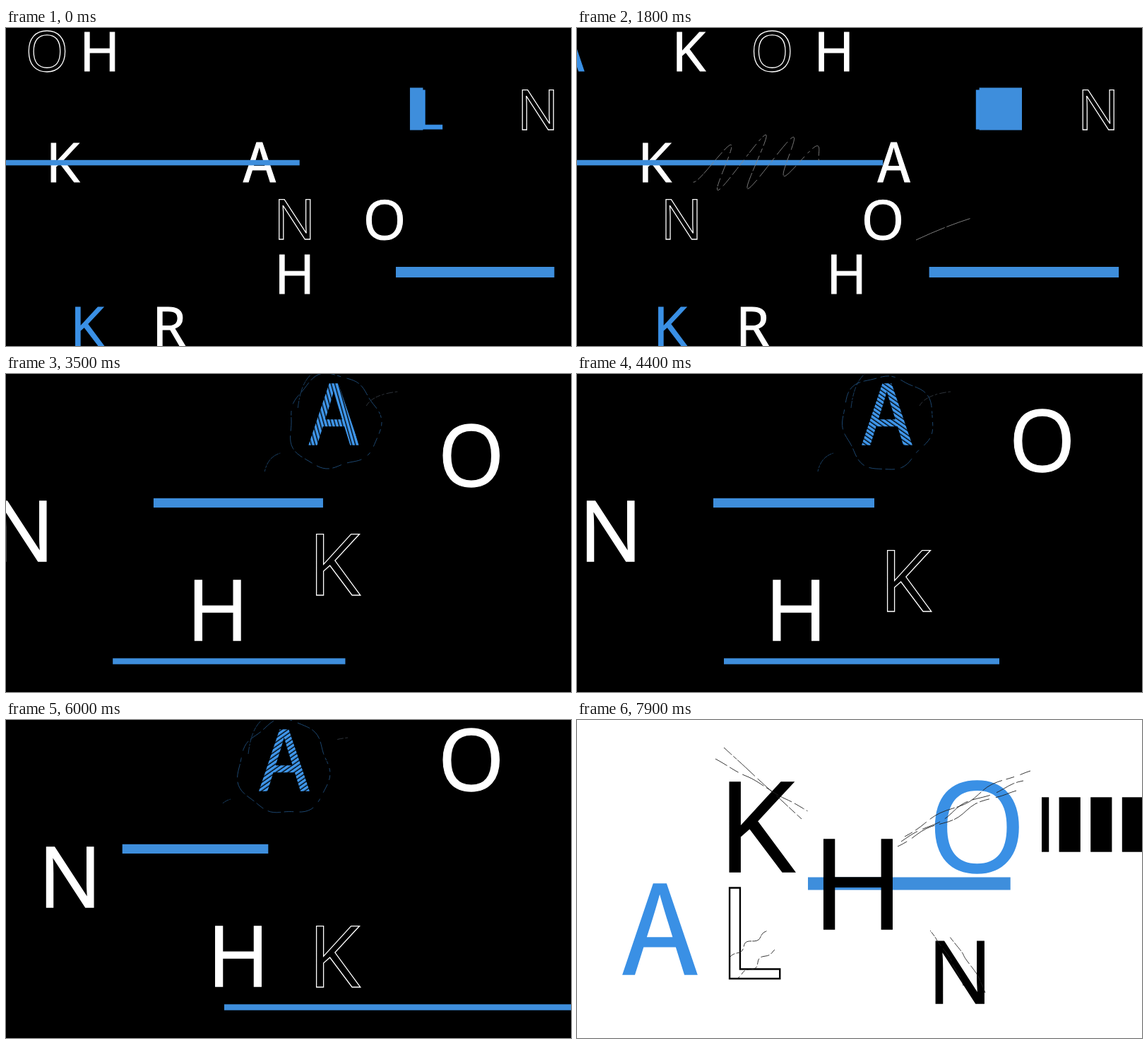
These frames come from a looping animation (800x450 px, 8000 ms). An HTML page:

```html
<!DOCTYPE html>
<html lang="en">
<head>
<meta charset="utf-8">
<title>Letters in motion</title>
<style>
  html, body { margin: 0; width: 100%; height: 100%; overflow: hidden; background: #000; }
  svg { display: block; width: 100vw; height: 100vh; }
  text { font-family: "Open Sans", "Noto Sans", sans-serif; }
  text.narrow { font-family: "Noto Sans CJK JP", "Noto Sans CJK SC", "Noto Sans CJK KR", "Open Sans", sans-serif; }
</style>
</head>
<body>
<svg id="stage" viewBox="0 0 800 450">
  <defs>
    <pattern id="hatch" width="10" height="5" patternUnits="userSpaceOnUse">
      <rect width="10" height="5" fill="#000"/>
      <rect width="10" height="3.6" fill="#3f97ec"/>
    </pattern>
  </defs>
</svg>
<script>
const BLUE = '#3e8edc', INK_BLUE = '#3a90e5', WHITE = '#fff', BLACK = '#000';
const stage = document.getElementById('stage');
const hatch = document.getElementById('hatch');

function add(parent, tag, attrs = {}) {
  const el = document.createElementNS('http://www.w3.org/2000/svg', tag);
  for (const k in attrs) el.setAttribute(k, attrs[k]);
  parent.appendChild(el);
  return el;
}

// Motion: every value is a constant or a function of seconds.
const at = (v, t) => typeof v === 'function' ? v(t) : v;
const line = (t0, a, t1, b) => t => a + (b - a) * (t - t0) / (t1 - t0);
const speedUp = (a, b, p = 2.7) => t => a + (b - a) * (t / 2.6) ** p;
const slowDown = (a, b, p = 2.75) => {
  const f = t => 1 - (1 - Math.min(t, 3) / 3) ** p;
  return t => a + (b - a) * f(t) / f(2.6);
};
const early = (a, b) => line(0, a, 2.6, b);
const mid = (a, b) => line(4.4, a, 6, b);
const late = (a, b) => line(6.7, a, 7.9, b);

const scenes = [];
function scene(from, to, hold, bg) {
  const g = add(stage, 'g');
  add(g, 'rect', { width: 800, height: 450, fill: bg });
  const s = { g, from, to, hold, parts: [] };
  scenes.push(s);
  return s;
}

// Letters are placed by the centre of their ink and by their baseline.
const pen = document.createElement('canvas').getContext('2d');
function ink(ch, family) {
  pen.font = '1000px ' + family;
  const m = pen.measureText(ch);
  return {
    centre: (m.actualBoundingBoxRight - m.actualBoundingBoxLeft) / 2000,
    height: m.actualBoundingBoxAscent / 1000
  };
}

// The cap height includes the stroke, which also gives filled letters their weight.
function letter(s, ch, cap, x, y, fill, stroke = fill, width = 0.8 + cap * 0.006) {
  const el = add(s.g, 'text', { fill, stroke, 'stroke-width': width });
  if (ch === 'A') el.setAttribute('class', 'narrow');
  el.textContent = ch;
  const family = getComputedStyle(el).fontFamily;
  const size = (cap - width) / ink('H', family).height;
  const shift = ink(ch, family).centre * size;
  el.setAttribute('font-size', size);
  s.parts.push(t => {
    el.setAttribute('x', at(x, t) - shift);
    el.setAttribute('y', at(y, t) - width / 2);
  });
}
const outline = (s, ch, cap, x, y, color = WHITE, width = 1.3) =>
  letter(s, ch, cap, x, y, 'none', color, width);

function bar(s, left, right, y, h, fill = BLUE) {
  const el = add(s.g, 'rect', { y, height: h, fill });
  s.parts.push(t => {
    const l = at(left, t);
    el.setAttribute('x', l);
    el.setAttribute('width', Math.max(0, at(right, t) - l));
  });
}

let seed = 11;
function random() {
  seed = seed * 16807 % 2147483647;
  return seed / 2147483647;
}

// Samples a function of 0..1 into a path.
function trace(f, n) {
  let d = '';
  for (let i = 0; i <= n; i++) d += (i ? 'L' : 'M') + f(i / n).map(v => v.toFixed(2));
  return d;
}

function brokenLine(on, off) {
  const list = [];
  for (let pos = 0; pos < 100;) {
    const end = pos + on * (0.3 + 1.4 * random());
    list.push([pos, Math.min(end, 100)]);
    pos = end + off * (0.2 + 1.6 * random());
  }
  return list;
}

function clipDashes(list, a, b) {
  const out = [0];
  let cur = 0;
  for (const [s0, e0] of list) {
    const s = Math.max(s0, a), e = Math.min(e0, b);
    if (e <= s) continue;
    out.push(s - cur, e - s);
    cur = e;
  }
  return out.concat(200).join(' ');
}

// A hand-drawn stroke, visible between two percentages of its length.
function scribble(s, shape, color, { from = 0, to = 100, on = 6, off = 1.5 } = {}) {
  const el = add(s.g, 'path', { fill: 'none', stroke: color, 'stroke-width': 0.9, pathLength: 100 });
  const list = brokenLine(on, off);
  s.parts.push(t => {
    el.setAttribute('d', at(shape, t));
    el.setAttribute('stroke-dasharray', clipDashes(list, at(from, t), at(to, t)));
  });
}

// A slightly shaky line between two points; bow bends it to one side.
function strand([x0, y0], [x1, y1], bow) {
  const phase = random() * 6;
  return trace(u => {
    const shake = 3 * Math.sin(Math.PI * u) * Math.sin(phase + 13 * u);
    return [x0 + (x1 - x0) * u + shake, y0 + (y1 - y0) * u ** bow + shake];
  }, 24);
}

// Strands side by side, spread more at the outer end than at the inner one.
function sheaf(s, outer, inner, shift, count, bow, spread, look) {
  for (let i = 0; i < count; i++) {
    const move = (p, k) => p.map((v, j) => v + shift[j] * i * k);
    scribble(s, strand(move(outer, 1), move(inner, spread), bow), '#222', look);
  }
}

// Scene one
const one = scene(0, 3.3, 3, BLACK);
letter(one, 'A', 57, slowDown(-180, 1), 62, INK_BLUE);
letter(one, 'K', 57, slowDown(-25, 174, 3.05), 62, WHITE);
outline(one, 'O', 57.5, slowDown(57.5, 292.5, 2.83), 62);
letter(one, 'H', 57, slowDown(132.5, 383), 62, WHITE);
letter(one, 'L', 57, speedUp(602, 545), 144, INK_BLUE);
outline(one, 'N', 58, speedUp(753, 715.5, 2.5), 145);
const boxMid = speedUp(581.2, 620, 2), boxWidth = slowDown(18.5, 61.5, 4);
bar(one, t => boxMid(t) - boxWidth(t) / 2, t => boxMid(t) + boxWidth(t) / 2, 84.5, 60);
letter(one, 'K', 57, early(84.5, 127), 218.5, WHITE);
letter(one, 'A', 57, slowDown(359, 481, 1.22), 218.5, WHITE);
bar(one, 0, early(415.7, 441), 186.8, 7.6);
outline(one, 'N', 58, slowDown(408.5, 121.5, 2.55), 300);
letter(one, 'O', 57, slowDown(535.5, 418, 2.2), 299.5, WHITE);
letter(one, 'H', 57, speedUp(408.5, 331.5, 2.85), 377, WHITE);
bar(one, speedUp(552, 423, 2.4), early(776.4, 763), 338, 15);
letter(one, 'K', 57, speedUp(119, 165), 451, INK_BLUE);
letter(one, 'R', 57, speedUp(234.3, 280.3, 2.6), 451, WHITE);

// Leaning loops that swell and fade out, counted in half turns.
const tail = line(1, -1.6, 2.6, -0.4), head = line(1, 2.4, 2.6, 11);
function loops(t) {
  const a = Math.max(-1.6, tail(t)), b = Math.max(a, head(t));
  return trace(u => {
    const k = a + (b - a) * u;
    const lift = 40 * Math.exp(-(((k - 2.2) / 4) ** 2)) * Math.cos(Math.PI * k);
    return [208 + 22 * k + 0.6 * lift + 11 * (t - 2.6), 195 - 2 * k - lift];
  }, 120);
}
scribble(one, loops, '#858585', { on: 2.5, off: 0.7 });
scribble(one, 'M480 300Q625 232 718 260', '#8a8a8a', { to: line(1.4, 0, 2.6, 100), on: 12, off: 1.2 });

// Scene two
const two = scene(3.3, 6.3, 6, BLACK);
const bigA = mid(439, 394);
const blob = t => trace(u => {
  const a = 2 * Math.PI * u;
  const r = 64 + 3 * Math.sin(3 * a + 2 * t) + 2 * Math.sin(7 * a - 3 * t);
  return [bigA(t) + r * Math.cos(a), 68 + 1.03 * r * Math.sin(a)];
}, 90);
scribble(two, blob, '#204f7c', { on: 3, off: 1.4 });
const wisp = (x, y, w, h) => t => `M${bigA(t) + x} ${y}q${w * 0.2} ${h * 0.8} ${w} ${h}`;
scribble(two, wisp(-98, 138, 22, -26), '#1c466d', { from: mid(0, 65), on: 14, off: 3 });
scribble(two, wisp(46, 45, 44, -20), '#343a42', { from: mid(0, 70), on: 14, off: 5 });
scribble(two, wisp(-51, 48, 24, -51), '#1c466d', { on: 12, off: 3 });
letter(two, 'A', 87, bigA, 100.5, 'url(#hatch)');
letter(two, 'O', 88, 658, mid(138.7, 100.7), WHITE);
letter(two, 'N', 87, mid(47.5, 90.5), 266, WHITE);
bar(two, mid(193, 164.7), mid(421, 371.3), 175.8, 13.2);
letter(two, 'H', 87, mid(310, 328.7), 378, WHITE);
outline(two, 'K', 88, 471, mid(337, 378.3));
bar(two, mid(208, 309), mid(598, 807), 402.3, 8.4);
const turn = mid(35, -35);
two.parts.push(t => hatch.setAttribute('patternTransform', `rotate(${turn(t)} ${bigA(t)} 57)`));

// Scene three
const three = scene(6.3, 8, 7.9, WHITE);
letter(three, 'A', 129.5, 117.5, late(297.3, 361), INK_BLUE);
bar(three, late(214, 327), late(542, 613.7), 222.5, 18);
letter(three, 'O', 130, late(637.6, 565.2), 216, INK_BLUE);
letter(three, 'K', 130, late(289.7, 263), 216, BLACK);
letter(three, 'H', 129.5, 397.5, late(367.3, 296.3), BLACK);
outline(three, 'L', 131, late(190, 251.5), 367.3, BLACK, 2.4);
letter(three, 'N', 89, 542, late(451.7, 401.2), BLACK);

const rowEnd = late(733, 658), rowWidth = late(26, 30.2);
for (let k = 0; k < 5; k++) {
  const right = 802 - 44.6 * k;
  bar(three, t => Math.max(right - rowWidth(t), rowEnd(t)), right, 109.3, 77.4, BLACK);
}

// Long strands shrink back to the centre before short ones sprout.
const arms = { from: line(6.25, 100, 6.6, 0), to: line(7.05, 100, 7.45, 0), on: 5, off: 1.8 };
sheaf(three, [150, 30], [360, 205], [78, 10], 2, 1.1, 0.1, arms);
sheaf(three, [671, 43], [440, 201], [-49, 38], 2, 1.5, 0.1, arms);
sheaf(three, [217, 325], [391, 243], [-39, 75], 2, 0.9, 0.2, arms);
sheaf(three, [605, 418], [390, 216], [-51, -42], 2, 0.7, 0.1, arms);
sheaf(three, [393, 239], [416, 221], [5, 3], 2, 1, 1, arms);

const sprouts = { to: line(7.2, 0, 7.7, 100), on: 14, off: 3 };
sheaf(three, [208, 39], [318, 140], [-12, 16], 2, 1, -0.7, sprouts);
sheaf(three, [642, 72], [464, 165], [-10, 14], 3, 1.2, 0.5, sprouts);
sheaf(three, [578, 386], [528, 307], [-31, -10], 2, 0.8, 0.9, sprouts);
sheaf(three, [217, 335], [270, 298], [11, 30], 2, 1, 0.9, sprouts);

function draw(ms) {
  const t = Math.floor((ms % 8000 + 5) / 100) % 80 / 10;
  for (const s of scenes) {
    const live = t >= s.from && t < s.to;
    s.g.style.display = live ? '' : 'none';
    if (live) s.parts.forEach(part => part(Math.min(t, s.hold)));
  }
}

const start = performance.now();
function tick() {
  draw(performance.now() - start);
  requestAnimationFrame(tick);
}
tick();
</script>
</body>
</html>
```
